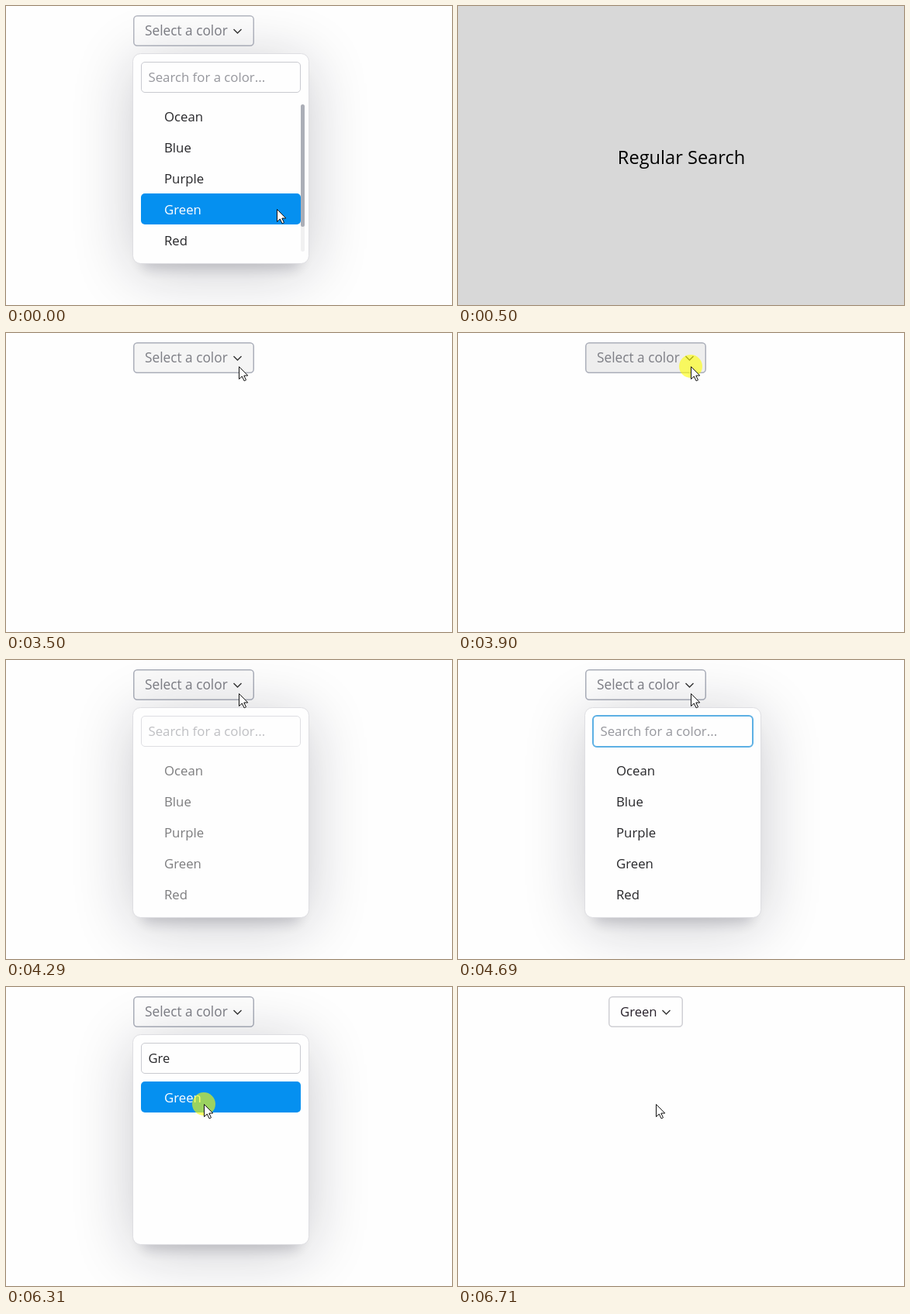
An HTML page that plays this animation: 575 by 386 pixels, repeating every 8 s.

```html
<!DOCTYPE html>
<html lang="en">
<head>
<meta charset="utf-8">
<title>Color select</title>
<style>
  html, body { margin: 0; width: 100%; height: 100%; overflow: hidden; background: #fefefe; }
  svg { display: block; width: 575px; height: 386px; font-family: "Open Sans", "Noto Sans", sans-serif; }
  .glow { fill: #101024; opacity: .22; filter: blur(40px); }
  .drop { fill: #101024; opacity: .16; filter: blur(8px); }
</style>
</head>
<body>
<svg id="stage" viewBox="0 0 575 386"></svg>
<script>
const stage = document.getElementById("stage");
const LOOP = 8000;
const COLORS = ["Ocean", "Blue", "Purple", "Green", "Red"];

const rect = (x, y, w, h, r, attrs) =>
  `<rect x="${x}" y="${y}" width="${w}" height="${h}" rx="${r}" ${attrs}/>`;
const text = (x, y, size, fill, str, more = "") =>
  `<text x="${x}" y="${y}" font-size="${size}" fill="${fill}" ${more}>${str}</text>`;

// Each step keeps the previous values and changes only what it names.
const steps = [];
let last = {};
function step(at, change) {
  last = { ...last, ...change };
  steps.push({ at, ...last });
}

step(0, { label: "", face: "#fefefe", edge: "#b4b7c1", mouse: [349.5, 262.5],
          open: true, items: COLORS, active: "Green", query: "", fade: 1, scrollbar: true });
step(500, { card: "Regular Search" });
step(2500, { card: "", open: false, scrollbar: false, active: "", edge: "#cfd1d9", mouse: [319.5, 77.5] });
step(3500, { face: "#f5f5f5", edge: "#abafba", mouse: [300.5, 43.5] });
step(3900, { face: "#eeeeee", click: true });
step(4090, { click: false });
step(4290, { open: true, face: "#fafafa", fade: .6 });
step(4490, { fade: 1, face: "#fefefe", focus: true, caret: 184 });
step(4690, { caret: 0 });
step(5090, { query: "G", items: ["Green"], caret: 195 });
step(5310, { query: "Gre", caret: 211 });
step(5510, { mouse: [297.5, 49.5] });
step(5710, { mouse: [255.5, 151.5], active: "Green" });
step(5910, { caret: 0 });
step(6310, { focus: false, click: true });
step(6710, { click: false, open: false, label: "Green", edge: "#cfcfd4" });

function button({ label, face, edge }) {
  const [x, w] = label ? [194, 96] : [164, 156];
  return rect(x + .75, 12.75, w - 1.5, 38.5, 4.5, `fill="${face}" stroke="${edge}" stroke-width="1.5"`) +
    text(x + 15, 38, label ? 16.7 : 17.3, label ? "#27202a" : "#7d7e85", label || "Select a color") +
    `<path d="M${x + w - 26.5} 30l5 5l5 -5" fill="none" stroke="#333" stroke-width="1.4"/>`;
}

function item(name, i, active) {
  const y = 122 + 40 * i, on = name === active;
  return (on ? rect(174, y, 206, 40, 5, 'fill="#0590f0"') : "") +
    text(204, y + 27, 16.8, on ? "#fff" : "#27272a", name);
}

function popup({ items, active, query, fade, focus, caret, scrollbar }) {
  const border = focus
    ? rect(174, 72, 206, 40, 5, 'fill="#fefefe" stroke="#5db0e4" stroke-width="2"')
    : rect(174.5, 72.5, 205, 39, 4.5, 'fill="#fefefe" stroke="#c9cad0"');
  const field = query
    ? text(183.5, 98, 16.5, "#27272a", query)
    : text(183.5, 98, 16.8, "#96979d", "Search for a color...");
  return rect(164, 72, 226, 270, 10, 'class="glow"') +
    rect(174, 80, 206, 260, 10, 'class="drop"') +
    rect(163.5, 61.5, 227, 271, 10, 'fill="#fefefe" stroke="#dedee2"') +
    `<g opacity="${fade}">${border}${field}${items.map((n, i) => item(n, i, active)).join("")}</g>` +
    (caret ? rect(caret, 79, 1, 25, 0, 'fill="#111"') : "") +
    (scrollbar
      ? rect(380, 127, 5, 190, 2.5, 'fill="#f0f0f1"') + rect(380, 127, 5, 158, 2.5, 'fill="#abaeb7"')
      : "");
}

function pointer({ mouse: [x, y], click }) {
  return (click ? `<circle cx="${x - .5}" cy="${y - .5}" r="15" fill="#ff0" opacity=".6"/>` : "") +
    `<path transform="translate(${x} ${y})" d="M0 0V16L3.8 12.5L6.6 18.3L9 17.2L6.3 11.5H11.3Z" fill="#fff" stroke="#111"/>`;
}

function draw(s) {
  stage.innerHTML = s.card
    ? rect(0, 0, 575, 386, 0, 'fill="#d8d8d8"') +
      text(288, 204, 23.6, "#000", s.card, 'text-anchor="middle"')
    : rect(0, 0, 575, 386, 0, 'fill="#fefefe"') + button(s) + (s.open ? popup(s) : "") + pointer(s);
}

let shown;
function tick(now) {
  const t = now % LOOP;
  const current = steps.findLast(s => s.at <= t) || steps[0];
  if (current !== shown) draw(shown = current);
  requestAnimationFrame(tick);
}
tick(0);
</script>
</body>
</html>
```
